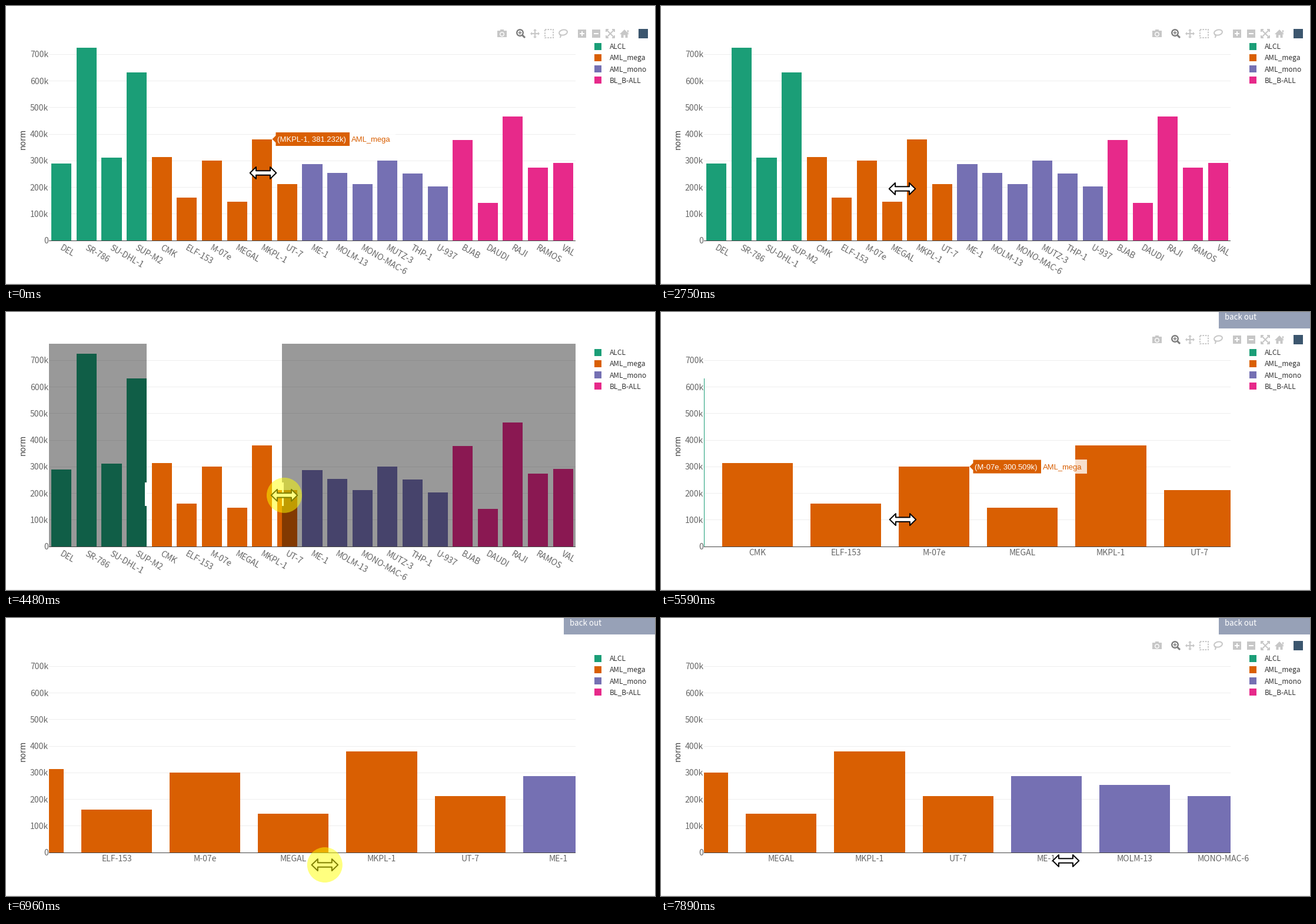
Write a matplotlib script that moves like this. It is 1103 px wide and 473 px high and loops after 7.99 s.

```python
import numpy as np
import matplotlib.pyplot as plt
from matplotlib.animation import FuncAnimation
from matplotlib.patches import Circle, Ellipse, Polygon, Rectangle

W, H, DPI = 1103, 473, 64
PT = 72 / DPI                      # points per pixel
STEP, COUNT = 34, 235
LEFT, RIGHT, TOP, BASE = 73, 968, 54, 399

GROUPS = {
    "ALCL": ("#1b9e77", {"DEL": 289.604, "SR-786": 724.418,
                         "SU-DHL-1": 311.127, "SUP-M2": 632.951}),
    "AML_mega": ("#d95f02", {"CMK": 314.862, "ELF-153": 161.745, "M-07e": 300.509,
                             "MEGAL": 145.938, "MKPL-1": 381.232, "UT-7": 212.694}),
    "AML_mono": ("#7570b3", {"ME-1": 286.415, "MOLM-13": 253.162, "MONO-MAC-6": 212.873,
                             "MUTZ-3": 299.816, "THP-1": 251.947, "U-937": 202.438}),
    "BL_B-ALL": ("#e7298a", {"BJAB": 378.254, "DAUDI": 140.617, "RAJI": 466.583,
                             "RAMOS": 274.209, "VAL": 292.481}),
}
DATA = [(name, value, group, color)
        for group, (color, rows) in GROUPS.items() for name, value in rows.items()]
Y_SCALE = 0.95 * (BASE - TOP) / max(value for _, value, _, _ in DATA)

# Drag that selects the zoom range, and drag that pans the axis
SELECT = (3810, 4560)
ZOOM_AT = 4620
SELECT_X, SELECT_END, SELECT_Y = 239, 493, 310
PAN = (6710, 7560)
PAN_X, PAN_END = 682, 272
PAN_LAG = 13

PITCH = (RIGHT - LEFT) / len(DATA)
SCALE = (RIGHT - LEFT) / (SELECT_END - SELECT_X)
OVERVIEW = (LEFT + PITCH / 2, PITCH)
DETAIL = (LEFT + (LEFT + PITCH / 2 - SELECT_X) * SCALE, PITCH * SCALE)

# Pointer moves: start, end, destination
HOME = (437, 284)
MOVES = [
    (30, 60, (438, 284)), (990, 1360, (385, 364)), (1720, 2050, (349, 338)),
    (2230, 2400, (316, 345)), (2400, 2735, (410, 311)),
    (3050, 3520, (SELECT_X - 0.1, SELECT_Y)), (*SELECT, (SELECT_END, 312)),
    (ZOOM_AT, 5390, (406, 372)), (5420, 5595, (411, 353)), (5595, 6210, (853, 331)),
    (6250, 6540, (PAN_X, 412)), (6790, 7370, (90, 446)),
    (7370, PAN[1], (PAN_END, 430)), (PAN[1], 7870, (688, 413)),
]


def ramp(t, start, end):
    return float(np.clip((t - start) / (end - start), 0, 1))


def cubic(u):
    return 4 * u ** 3 if u < 0.5 else 1 - 4 * (1 - u) ** 3


def glide(t, start, end):
    """Progress of a hand movement, halfway between linear and smoothstep."""
    u = ramp(t, start, end)
    return (u + u * u * (3 - 2 * u)) / 2


def pointer(t):
    position = np.array(HOME, float)
    for start, end, target in MOVES:
        position += (np.array(target) - position) * glide(t, start, end)
    return position


def y_of(value):
    return BASE - Y_SCALE * value


plt.rcParams["font.family"] = "Noto Sans CJK JP"
fig = plt.figure(figsize=(W / DPI, H / DPI), dpi=DPI, facecolor="white")
ax = fig.add_axes([0, 0, 1, 1])
ax.set(xlim=(0, W), ylim=(H, 0))
ax.axis("off")


def rect(x, y, w, h, color, z=1, **kw):
    return ax.add_patch(Rectangle((x, y), w, h, fc=color, ec="none", lw=0,
                                  zorder=z, snap=False, **kw))


def line(xs, ys, color, width, z=1):
    return ax.plot(xs, ys, color=color, lw=width * PT, zorder=z,
                   solid_capstyle="butt", snap=False)[0]


def poly(points, color, z=1, **kw):
    return ax.add_patch(Polygon(points, closed=True, fc=color, zorder=z, **kw))


def label(x, y, text, size, color, z=2, **kw):
    return ax.text(x, y, text, fontsize=size * PT, color=color, zorder=z, **kw)


def draw_frame_and_legend():
    for k in range(8):
        y = y_of(100 * k)
        if k:
            rect(LEFT, int(y), RIGHT - LEFT, 1, "#eeeeee")
        label(72, y + 5, f"{k}00k" if k else "0", 14, "#666666", ha="right")
    rect(LEFT, BASE, RIGHT - LEFT, 1, "#444444", z=4)
    rect(0, H - 1, W, 1, "#eeeeee")
    label(32.5, 226.5, "norm", 14, "#444444", rotation=90,
          rotation_mode="anchor", ha="center")
    for k, (group, (color, _)) in enumerate(GROUPS.items()):
        rect(1000, 63 + 19 * k, 12, 12, color)
        label(1026, 73 + 19 * k, group, 12, "#333333")


def draw_modebar():
    pale, dark, white, mid = "#c7c7c7", "#7c7c7c", "white", 47

    def ring(shape, color, width):
        shape.set(fc="none", ec=color, lw=width * PT)
        ax.add_patch(shape)

    def cross(x, y, arm, color, width, z=1):
        line([x - arm, x + arm], [y, y], color, width, z)
        line([x, x], [y - arm, y + arm], color, width, z)

    # camera
    rect(835, 42, 16, 11, pale)
    rect(840, 40, 6, 3, pale)
    for radius, color in ((4, white), (2.6, pale)):
        ax.add_patch(Circle((843, 48), radius, fc=color, ec="none"))
    # magnifier
    ring(Circle((873.5, 45.5), 5.3), dark, 2.3)
    line([877, 882], [49, 54], dark, 3)
    cross(873.5, 45.5, 3, dark, 1.5)
    # pan arrows
    cross(899, mid, 7, pale, 2)
    for dx, dy in ((1, 0), (-1, 0), (0, 1), (0, -1)):
        cx, cy = 899 + 5 * dx, mid + 5 * dy
        poly([(cx + 3 * dx, cy + 3 * dy), (cx + 3 * dy, cy + 3 * dx),
              (cx - 3 * dy, cy - 3 * dx)], pale, ec="none")
    # dashed box and lasso
    ring(Rectangle((916, 40), 14, 14, ls=(0, (1.3, 0.9))), pale, 2)
    ring(Ellipse((947, 45), 14, 9, angle=-12), pale, 2)
    line([941, 943, 941.5], [48, 51, 54], pale, 2)
    # zoom in and out
    for x in (979, 1003):
        rect(x - 7, mid - 7, 14, 14, pale)
    cross(979, mid, 4, white, 2, z=2)
    line([999, 1007], [mid, mid], white, 2, z=2)
    # autoscale
    for sx in (-1, 1):
        for sy in (-1, 1):
            line([1027, 1027 + 6 * sx], [mid, mid + 6 * sy], pale, 2)
            line([1027 + 3 * sx, 1027 + 7 * sx, 1027 + 7 * sx],
                 [mid + 7 * sy, mid + 7 * sy, mid + 3 * sy], pale, 2)
    # home
    poly([(1043, 48), (1051, 40), (1059, 48)], pale, ec="none")
    rect(1045.5, 47, 11, 7, pale)
    rect(1049.5, 49.5, 3, 4.5, white, z=2)
    rect(1056, 41, 2, 4, pale)
    rect(1075, 39, 16, 16, "#3c566e")


draw_frame_and_legend()
draw_modebar()
modebar_veil = rect(832, 37, 262, 20, "white", z=2.5)

plot_area = Rectangle((LEFT, TOP), RIGHT - LEFT, BASE - TOP + 1, transform=ax.transData)
bars, slanted, flat = [], [], []
for name, value, group, color in DATA:
    top = round(y_of(value))
    bar = rect(0, top, 1, BASE - top, color, z=3)
    bar.set_clip_path(plot_area)
    bars.append(bar)
    slanted.append(label(0, 413.5, name, 14, "#666666", rotation=-30, rotation_mode="anchor"))
    flat.append(label(0, 414, name, 14, "#666666", ha="center"))

shades = [rect(LEFT, TOP, SELECT_X - LEFT, BASE - TOP, "black", z=5),
          rect(SELECT_X, TOP, RIGHT - SELECT_X, BASE - TOP, "black", z=5)]
handles = [rect(x, SELECT_Y - 20, 3, 40, "white", z=6) for x in (SELECT_X - 3, SELECT_X)]

notice = [rect(948, 0, 155, 28, "#97a1b7", z=6),
          label(958, 13, "back out", 13.3, "white", z=7)]

tip_box = poly([(0, 0)] * 3, "black", z=8, ec="none")
tip_text = label(0, 0, "", 13, "white", z=9, family="Liberation Sans")
name_box = rect(0, 0, 1, 24, "white", z=8, alpha=0.8)
name_text = label(0, 0, "", 13, "black", z=9, family="Liberation Sans")
tooltip = [tip_box, tip_text, name_box, name_text]

HEAD = [(-12, 3.7), (-12, 10), (-22.3, 0), (-12, -10), (-12, -3.7)]
ARROW = np.array(HEAD + [(-x, -y) for x, y in HEAD])
cursor = poly(ARROW, "white", z=10, ec="black", lw=2 * PT, joinstyle="round")
press = ax.add_patch(Circle((0, 0), 30, fc="#ffff00", ec="none", alpha=0.5, zorder=11))
renderer = fig.canvas.get_renderer()


def text_width(artist):
    return artist.get_window_extent(renderer).width


def show_tooltip(index, x):
    name, value, group, color = DATA[index]
    y = y_of(value)
    tip_text.set_text(f"({name}, {value:.3f}k)")
    tip_text.set_position((x + 8.5, y + 4.5))
    left, end = x + 6, round(x + 15 + text_width(tip_text))
    tip_box.set_xy([(x, y), (left, y - 6), (left, y - 11.5), (end, y - 11.5),
                    (end, y + 11.5), (left, y + 11.5), (left, y + 6)])
    tip_box.set_facecolor(color)
    name_text.set(text=group, color=color, position=(end + 3, y + 4.5))
    name_box.set(x=end, y=round(y - 12), width=round(text_width(name_text) + 11))


def pan_offset(t):
    if t < PAN[0]:
        return 0
    return round(pointer(min(t, PAN[1]) - (PAN_LAG if t < PAN[1] else 0))[0] - PAN_X)


def modebar_opacity(t):
    if t < ZOOM_AT:
        return 1 - ramp(t, 3850, 4130)
    if t < PAN[1]:
        return ramp(t, ZOOM_AT, 4920) * (1 - ramp(t, PAN[0], 6940))
    return ramp(t, PAN[1], 7860)


def place_bars(t, zoomed):
    first, pitch = DETAIL if zoomed else OVERVIEW
    shift = pan_offset(t)
    for i, bar in enumerate(bars):
        center = first + pitch * i
        left, right = round(center - 0.4 * pitch), round(center + 0.4 * pitch)
        bar.set(x=left + shift, width=right - left)
        center += shift
        slanted[i].set(x=center - 4, visible=not zoomed)
        flat[i].set(x=center, visible=zoomed and LEFT <= center <= RIGHT)


def update(frame):
    t = frame * STEP + STEP / 2
    x, y = pointer(t)
    selecting = SELECT[0] <= t < ZOOM_AT
    dragging = selecting or PAN[0] <= t < PAN[1]
    place_bars(t, zoomed=t >= ZOOM_AT)

    hovered = None
    for i, bar in enumerate(bars):
        left = bar.get_x()
        if left <= x <= left + bar.get_width() and bar.get_y() <= y <= BASE and not dragging:
            hovered = i, left + bar.get_width() + 0.5
    for artist in tooltip:
        artist.set_visible(hovered is not None)
    if hovered:
        show_tooltip(*hovered)

    fade = cubic(ramp(t, 3940, 4150)) if selecting else 0
    edge = round(SELECT_X + (SELECT_END - SELECT_X) * glide(t, 3915, SELECT[1]))
    shades[1].set(x=edge, width=RIGHT - edge)
    handles[1].set_x(edge)
    for shade, handle in zip(shades, handles):
        shade.set_alpha(0.4 * fade)
        handle.set_alpha(fade)

    modebar_veil.set_alpha(1 - modebar_opacity(t))
    for artist in notice:
        artist.set_alpha(cubic(ramp(t, 4880, 5620)))

    cursor.set_xy(ARROW + (x, y))
    press.set(center=(x, y), visible=dragging)
    return bars


animation = FuncAnimation(fig, update, frames=COUNT, interval=STEP, repeat=True,
                          repeat_delay=0, blit=False, cache_frame_data=False)
plt.show()
```
